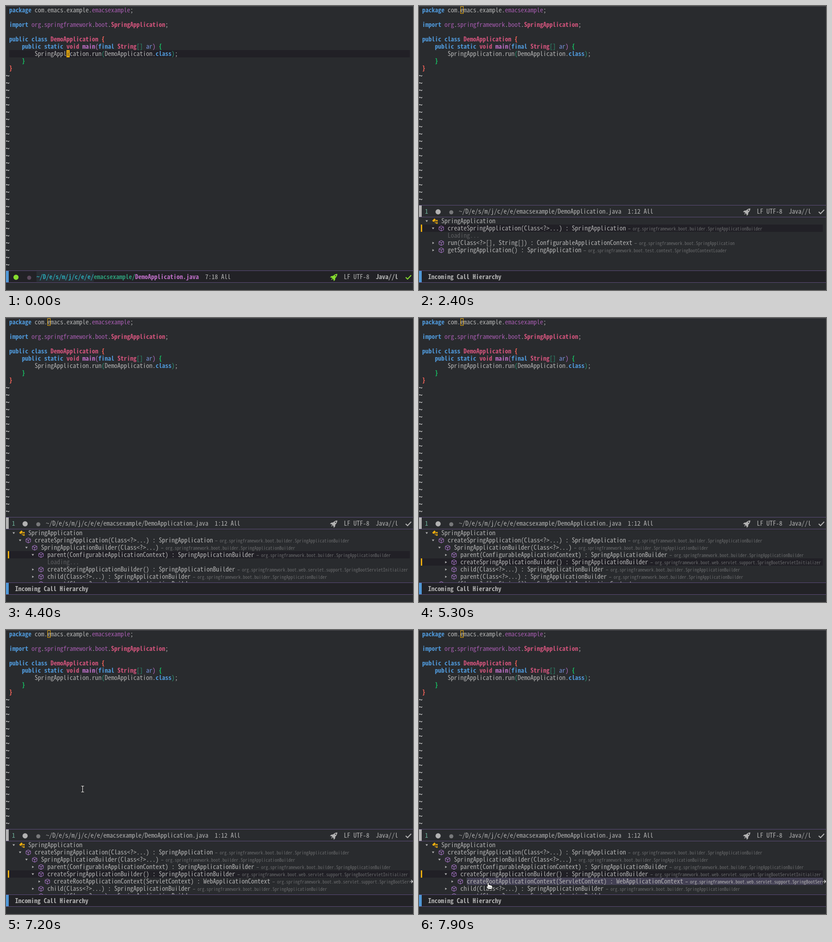
An HTML page with a canvas that plays this animation: 895x625 px, repeating every 8 s.

```html
<!DOCTYPE html>
<html lang="en">
<head>
<meta charset="utf-8">
<title>Call hierarchy in an editor</title>
<style>
  html, body { margin: 0; width: 100%; height: 100%; overflow: hidden; background: #292b2e; }
  canvas { display: block; }
</style>
</head>
<body>
<canvas id="stage" width="895" height="625"></canvas>
<script>
const ctx = document.getElementById('stage').getContext('2d');
const LOOP = 8000, STEP = 100, CELL = 7, SMALL_CELL = 5, LINE = 16, TREE_TOP = 465;
const FONT = '"Noto Sans Mono CJK JP", "Noto Sans Mono CJK SC", "Noto Sans Mono", monospace';
const C = {
  bg: '#292b2e', dark: '#212026', fg: '#b2b2b2', border: '#5d4d7a', keyword: '#4f97d7',
  type: '#ce537a', func: '#bc6ec5', constant: '#a45bad', variable: '#7590db', teal: '#2d9574',
  cyan: '#2aa1ae', outer: '#ff665c', inner: '#16c464', yellow: '#eead0e', green: '#86dc2f',
  dim: '#696a6c', loading: '#5b5c5f', hover: '#444155', cube: '#b77fdb', fringe: '#d8d8d8'
};

// Runs are [text, colour, bold]; a plain string uses the default colour.
const kw = s => [s, C.keyword, true], type = s => [s, C.type, true], cst = s => [s, C.constant];
const code = [
  [kw('package'), ' com.emacs.example.', cst('emacsexample'), ';'],
  [],
  [kw('import '), cst('org'), '.', cst('springframework'), '.', cst('boot'), '.', type('SpringApplication'), ';'],
  [],
  [kw('public class '), type('DemoApplication '), ['{', C.outer, true]],
  [kw('    public static '), type('void '), ['main', C.func, true], ['(', C.func], kw('final '),
    type('String'), ['[]', C.teal], [' ar', C.variable], [')', C.func], [' {', C.inner, true]],
  ['        SpringApplication.run', ['(', C.teal], 'DemoApplication.', kw('class'), [')', C.teal], ';'],
  [['    }', C.inner, true]],
  [['}', C.outer, true]]
];

const boot = 'org.springframework.boot.';
const builderClass = boot + 'builder.SpringApplicationBuilder';
const servletClass = boot + 'web.servlet.support.SpringBootServletInitializer';

function rect(x, y, w, h, color) {
  ctx.fillStyle = color;
  ctx.fillRect(x, y, w, h);
}

function text(s, x, y, color = C.fg, bold = false, cell = CELL) {
  ctx.font = `${bold ? 'bold ' : ''}${cell * 2}px ${FONT}`;
  ctx.letterSpacing = '0px';
  ctx.letterSpacing = cell - ctx.measureText('0').width + 'px';
  ctx.fillStyle = color;
  ctx.fillText(s, x, y);
  return x + s.length * cell;
}

function runs(list, x, y) {
  for (const run of list) x = text(...(typeof run === 'string' ? [run, x, y] : [run[0], x, y, run[1], run[2]]));
}

function shape(points, color, stroke) {
  ctx.beginPath();
  points.forEach(([x, y]) => ctx.lineTo(x, y));
  ctx.closePath();
  if (color) { ctx.fillStyle = color; ctx.fill(); }
  if (stroke) { ctx.strokeStyle = stroke; ctx.lineWidth = 1; ctx.stroke(); }
}

function line(points, color, width = 1) {
  ctx.beginPath();
  points.forEach(([x, y]) => ctx.lineTo(x, y));
  ctx.strokeStyle = color;
  ctx.lineWidth = width;
  ctx.stroke();
}

function disc(x, y, r, color) {
  ctx.beginPath();
  ctx.arc(x, y, r, 0, 2 * Math.PI);
  ctx.fillStyle = color;
  ctx.fill();
}

function at(x, y, draw) {
  ctx.save();
  ctx.translate(x, y);
  draw();
  ctx.restore();
}

function rocket(x, y, color) {
  at(x, y, () => {
    ctx.rotate(Math.PI / 4);
    ctx.beginPath();
    ctx.moveTo(0, -10);
    ctx.bezierCurveTo(4, -6, 4, 0, 2.5, 5);
    ctx.lineTo(-2.5, 5);
    ctx.bezierCurveTo(-4, 0, -4, -6, 0, -10);
    ctx.fillStyle = color;
    ctx.fill();
    shape([[-3, -1], [-6, 3], [-6, 7], [-2, 4]], color);
    shape([[3, -1], [6, 3], [6, 7], [2, 4]], color);
    shape([[-1.5, 6], [1.5, 6], [0, 9]], color);
    disc(0, -4.5, 1.3, C.dark);
  });
}

function editor(rows, active) {
  if (active) rect(7, 97, 881, LINE, C.dark);
  code.forEach((list, i) => runs(list, 7, 14 + i * LINE));
  for (let i = code.length; i < rows; i++) {
    const y = 9.5 + i * LINE;
    line([[0, y + 1], [1, y - 0.7], [2.5, y - 0.7], [4.5, y + 0.7], [6, y + 0.7], [7, y - 1]], C.fringe, 1.2);
  }
  if (active) {
    rect(133, 97, CELL, LINE, C.yellow);
    text('i', 133, 110, C.bg);
  } else {
    ctx.strokeStyle = C.yellow;
    ctx.lineWidth = 1;
    ctx.strokeRect(91.5, 1.5, 6, 15);
  }
}

function modeLine(top, active) {
  rect(0, top, 895, 27, active ? '#222226' : C.bg);
  rect(0, top, 895, 1, C.border);
  rect(0, top + 26, 895, 1, C.border);
  rect(0, top + 1, 6, 25, active ? C.keyword : C.fg);
}

function fileStatus(top, active) {
  modeLine(top, active);
  const y = top + 19, accent = active ? C.green : C.fg;
  if (!active) text('1', 13, y, '#6fb39c');
  disc(active ? 22 : 42, top + 15, 5.7, accent);
  disc(active ? 51 : 71, top + 16, 4.5, active ? '#5c4a5c' : '#77787a');
  if (active) {
    rect(67, top + 2, 126, 23, '#292e34');
    runs([['~/D/e/s/m/j/c/e/e/', C.cyan, true], ['emacsexample/', C.teal, true],
      ['DemoApplication.java', C.func, true], '  7:18 All'], 67, y);
  } else {
    text('~/D/e/s/m/j/c/e/e/emacsexample/DemoApplication.java  1:12 All', 88, y);
  }
  rocket(721.5, top + 14.5, accent);
  text('LF UTF-8', 743, y);
  text('Java//l', 813, y, C.fg, active);
  line([[879, top + 15], [883, top + 19], [891, top + 10.5]], accent, 2.2);
}

function treeRows(t) {
  const rows = [];
  const add = (depth, label, place, open = false) => rows.push({ depth, label, place, open });
  const loading = depth => rows.push({ depth, loading: true });
  add(0, 'SpringApplication', '', true);
  if (t < 1100) { loading(0); return rows; }
  add(1, 'createSpringApplication(Class<?>...) : SpringApplication', builderClass, t >= 2400);
  if (t >= 2400 && t < 2700) loading(1);
  if (t >= 2700) add(2, 'SpringApplicationBuilder(Class<?>...)', builderClass, t >= 3100);
  if (t >= 3100 && t < 3200) loading(2);
  if (t >= 3200) {
    add(3, 'parent(ConfigurableApplicationContext) : SpringApplicationBuilder', builderClass, t >= 4400 && t < 5000);
    if (t >= 4400 && t < 4500) loading(3);
    add(3, 'createSpringApplicationBuilder() : SpringApplicationBuilder', servletClass, t >= 5600);
    if (t >= 5600) add(4, 'createRootApplicationContext(ServletContext) : WebApplicationContext', servletClass);
    add(3, 'child(Class<?>...) : SpringApplicationBuilder', builderClass);
    add(3, 'parent(Class<?>...) : SpringApplicationBuilder', builderClass);
  }
  add(1, 'run(Class<?>[], String[]) : ConfigurableApplicationContext', boot + 'SpringApplication');
  add(1, 'getSpringApplication() : SpringApplication', boot + 'test.context.SpringBootContextLoader');
  return rows;
}

function classIcon(x, y) {
  shape([[x - 6, y - 1], [x - 1, y - 6], [x + 2, y - 3], [x - 3, y + 2]], C.yellow);
  line([[x, y - 1], [x + 3, y - 1]], C.yellow);
  line([[x + 0.5, y - 1], [x + 0.5, y + 4], [x + 3, y + 4]], C.yellow);
  for (const dy of [-1, 4]) shape([[x + 2, y + dy], [x + 4.3, y + dy - 2.3], [x + 6.6, y + dy], [x + 4.3, y + dy + 2.3]], C.yellow);
}

function cubeIcon(x, y) {
  shape([[x, y - 5.5], [x + 5, y - 3], [x + 5, y + 3], [x, y + 5.5], [x - 5, y + 3], [x - 5, y - 3]], null, C.cube);
  line([[x - 5, y - 3], [x, y - 0.5], [x + 5, y - 3]], C.cube);
  line([[x, y - 0.5], [x, y + 5.5]], C.cube);
}

function treeRow(row, top, hovered) {
  const x = 49 + row.depth * 14, base = top + 13;
  if (row.loading) {
    text('Loading...', x, base, C.loading);
    return;
  }
  const arrow = x - 32, placeX = x + row.label.length * CELL;
  const end = row.place ? placeX + (row.place.length + 3) * SMALL_CELL : placeX;
  if (row.open) shape([[arrow - 2.7, top + 6.5], [arrow + 2.7, top + 6.5], [arrow, top + 10.5]], C.fg);
  else shape([[arrow - 1.5, top + 6], [arrow + 2.5, top + 8.5], [arrow - 1.5, top + 11]], C.fg);
  (row.depth ? cubeIcon : classIcon)(x - 14, top + 8.5);

  ctx.save();
  ctx.beginPath();
  ctx.rect(0, top, 888, LINE);
  ctx.clip();
  if (hovered) rect(x, top, end - x, LINE, C.hover);
  text(row.label, x, base);
  if (row.place) {
    const color = hovered ? C.fg : C.dim;
    rect(placeX + SMALL_CELL, top + 9, SMALL_CELL, 1, color);
    text(row.place, placeX + 3 * SMALL_CELL, base, color, false, SMALL_CELL);
  }
  ctx.restore();

  if (end > 888) {
    line([[889, top + 8.5], [894, top + 8.5]], C.fringe, 1.3);
    line([[891, top + 5], [894.5, top + 8.5], [891, top + 12]], C.fringe, 1.3);
  }
}

function tree(t, pointer) {
  const selected = [1600, 2900, 3700, 5300].filter(time => t >= time).length;
  const hovered = pointer ? Math.floor((pointer.y - TREE_TOP) / LINE) : -1;
  ctx.save();
  ctx.beginPath();
  ctx.rect(0, TREE_TOP, 895, 582 - TREE_TOP);
  ctx.clip();
  rect(7, TREE_TOP + selected * LINE, 881, LINE, C.dark);
  rect(4, TREE_TOP + selected * LINE, 3, LINE, C.yellow);
  treeRows(t).forEach((row, i) => treeRow(row, TREE_TOP + i * LINE, i === hovered));
  ctx.restore();
}

// Pointer stops, one per step, starting when it first appears.
const pointerPath = [[160, 86], [160, 138], [162, 205], [164, 280], [168, 350],
  [172, 428], [177, 489], [181, 538], [190, 548], [181, 557], [164, 558], [152, 556]];

function pointerAt(t) {
  const stop = pointerPath[(t - 6800) / STEP];
  return stop && { x: stop[0], y: stop[1] };
}

function drawPointer({ x, y }) {
  at(x, y, () => {
    if (y < 438) {
      const beam = [[[-2.5, -6.5], [3.5, -6.5]], [[0.5, -6.5], [0.5, 6.5]], [[-2.5, 6.5], [3.5, 6.5]]];
      beam.forEach(part => line(part, '#111', 3));
      beam.forEach(part => line(part, '#fff', 1.2));
    } else {
      shape([[-1.5, 0.5], [0, -0.5], [1.5, 0.5], [1.5, 5], [4, 4.5], [5, 6], [7, 5.5], [8, 7], [9.5, 7.5],
        [9.5, 11], [8, 14.5], [0.5, 14.5], [-4, 9], [-3.5, 7.5], [-1.5, 8.5]], '#fff', '#111');
      for (const fx of [1.5, 4, 6.5]) line([[fx, 9], [fx, 12.5]], '#555', 0.8);
    }
  });
}

function echoText(t) {
  if (t < 200 || t >= 1600) return '';
  return t < 700 ? ',-' : t < 900 ? ', g-' : ', g h';
}

function draw(t) {
  rect(0, 0, 895, 625, C.bg);
  rect(0, 0, 895, 1, '#4c4c52');
  if (t < 1000) {
    editor(36, true);
    fileStatus(582, true);
  } else {
    const pointer = pointerAt(t);
    editor(27, false);
    fileStatus(438, false);
    tree(t, pointer);
    modeLine(582, true);
    text('Incoming Call Hierarchy', 20, 601, C.fg, true);
    if (pointer) drawPointer(pointer);
  }
  text(echoText(t), 7, 622);
}

function tick() {
  draw(Math.floor(performance.now() % LOOP / STEP) * STEP);
  requestAnimationFrame(tick);
}
tick();
</script>
</body>
</html>
```
